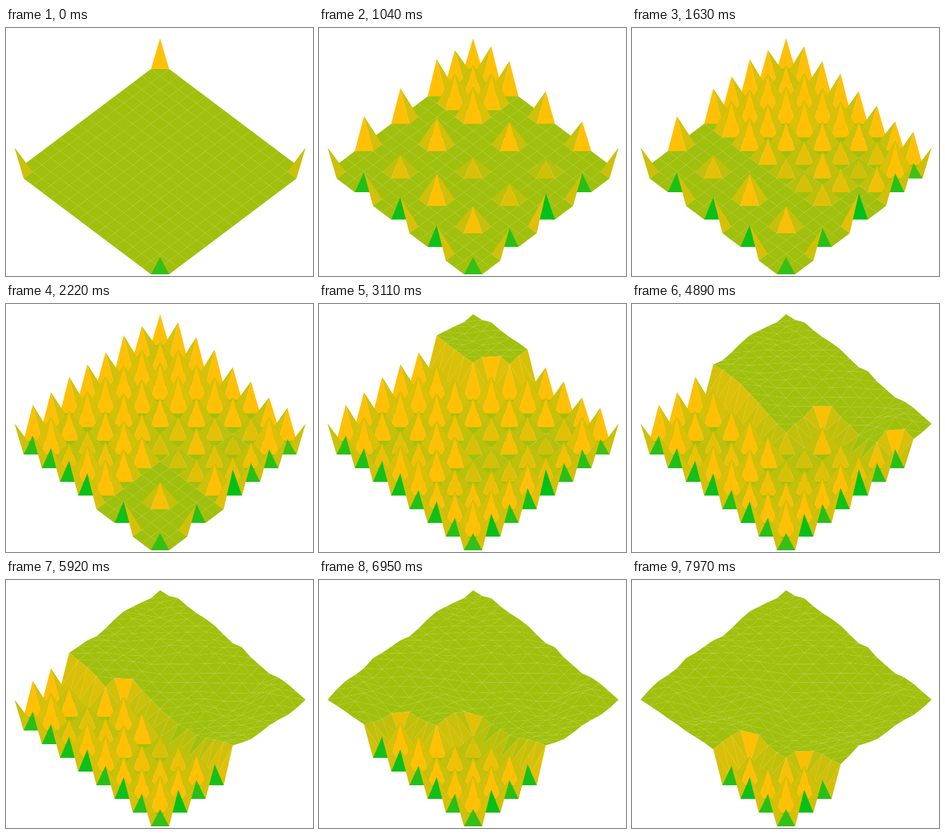
These frames come from a looping animation (538x435 px, 8 s). An HTML page with a canvas:

```html
<!DOCTYPE html>
<html lang="en">
<head>
<meta charset="utf-8">
<title>Terrain subdivision</title>
<style>
  html, body { margin: 0; width: 100%; height: 100%; overflow: hidden; background: #fff; }
  canvas { display: block; }
</style>
</head>
<body>
<canvas id="stage" width="538" height="435"></canvas>
<script>
const ctx = document.getElementById('stage').getContext('2d');
const N = 16, LOOP = 8000;

// Heights at even grid points, one row per i = 0, 2, ... 16
const coarse = [
  [42, 45, 53, 47, 50, 52, 49, 51, 42],
  [52, 42, 52, 48, 53, 51, 40, 54, 45],
  [50, 52, 53, 47, 47, 40, 30, 32, 47],
  [52, 50, 53, 39, 35, 47, 34, 51, 49],
  [45, 51, 40, 30, 26, 43, 45, 51, 51],
  [44, 40, 30, 35, 23, 26, 34, 38, 46],
  [40, 29, 22, 30, 28, 32, 36, 41, 50],
  [46, 54, 34, 32, 44, 42, 45, 52, 45],
  [42, 39, 45, 45, 58, 49, 45, 52, 42]
];
// Odd points along the two far edges
const farRight = [44, 50, 52, 48, 50, 42, 45, 44];
const farLeft = [40, 49, 51, 45, 51, 55, 49, 48];

function jitter(i, j) {
  const s = Math.sin(i * 127.1 + j * 311.7) * 43758.5453;
  return (s - Math.floor(s) - 0.5) * 4;
}

function finalHeight(i, j) {
  if (j === 0 && i % 2) return farRight[i >> 1];
  if (i === 0 && j % 2) return farLeft[j >> 1];
  const a = i >> 1, b = j >> 1, c = (i + 1) >> 1, d = (j + 1) >> 1;
  const mean = (coarse[a][b] + coarse[c][b] + coarse[a][d] + coarse[c][d]) / 4;
  return i % 2 || j % 2 ? mean + jitter(i, j) : mean;
}

// Step at which each point is raised: blocks are split breadth first
const born = Array.from({ length: N + 1 }, () => Array(N + 1).fill(Infinity));
const raise = (i, j, step) => { born[i][j] = Math.min(born[i][j], step); };
for (const i of [0, N]) for (const j of [0, N]) raise(i, j, 0);

const queue = [[0, 0, N]];
for (let step = 1; step <= queue.length; step++) {
  const [i, j, size] = queue[step - 1], h = size / 2;
  raise(i + h, j, step);
  raise(i, j + h, step);
  raise(i + h, j + h, step);
  raise(i + size, j + h, step);
  raise(i + h, j + size, step);
  if (h > 1) queue.push([i, j, h], [i + h, j, h], [i, j + h, h], [i + h, j + h, h]);
}

const heights = born.map((row, i) => row.map((_, j) => finalHeight(i, j)));

function stepAt(t) {
  if (t < 592) return 0;
  const shown = t < 6368
    ? 592 + Math.floor((t - 592) / 147.95) * 147.95
    : 6368 + Math.floor((t - 6368) / 145.4) * 145.4;
  return Math.floor((shown - 426) / 99.8);
}

function shade(drop) {
  const d = Math.abs(drop) < 11 ? 0 : drop;
  const red = Math.max(0, Math.min(255, 161 + d * (1.9 + 0.0004 * d * d)));
  return `rgb(${Math.round(red)},192,${Math.round(13 - (red - 161) * 0.08)})`;
}

function triangle(a, b, c, drop) {
  ctx.fillStyle = shade(drop);
  ctx.beginPath();
  ctx.moveTo(a.x, a.y);
  ctx.lineTo(b.x, b.y);
  ctx.lineTo(c.x, c.y);
  ctx.closePath();
  ctx.fill();
}

function draw(t) {
  const step = stepAt(t);
  const point = (i, j) => {
    const h = born[i][j] <= step ? heights[i][j] : 0;
    return { h, x: 270 + 15.94 * (i - j), y: 60 + 12 * (i + j) - h };
  };
  ctx.fillStyle = '#fff';
  ctx.fillRect(0, 0, 538, 435);
  for (let i = 0; i < N; i++) {
    for (let j = 0; j < N; j++) {
      const back = point(i, j), right = point(i + 1, j);
      const left = point(i, j + 1), front = point(i + 1, j + 1);
      const mid = (right.h + left.h) / 2;
      triangle(back, right, left, back.h - mid);
      triangle(right, front, left, mid - front.h);
    }
  }
}

function tick() {
  draw(performance.now() % LOOP);
  requestAnimationFrame(tick);
}
tick();
</script>
</body>
</html>
```
